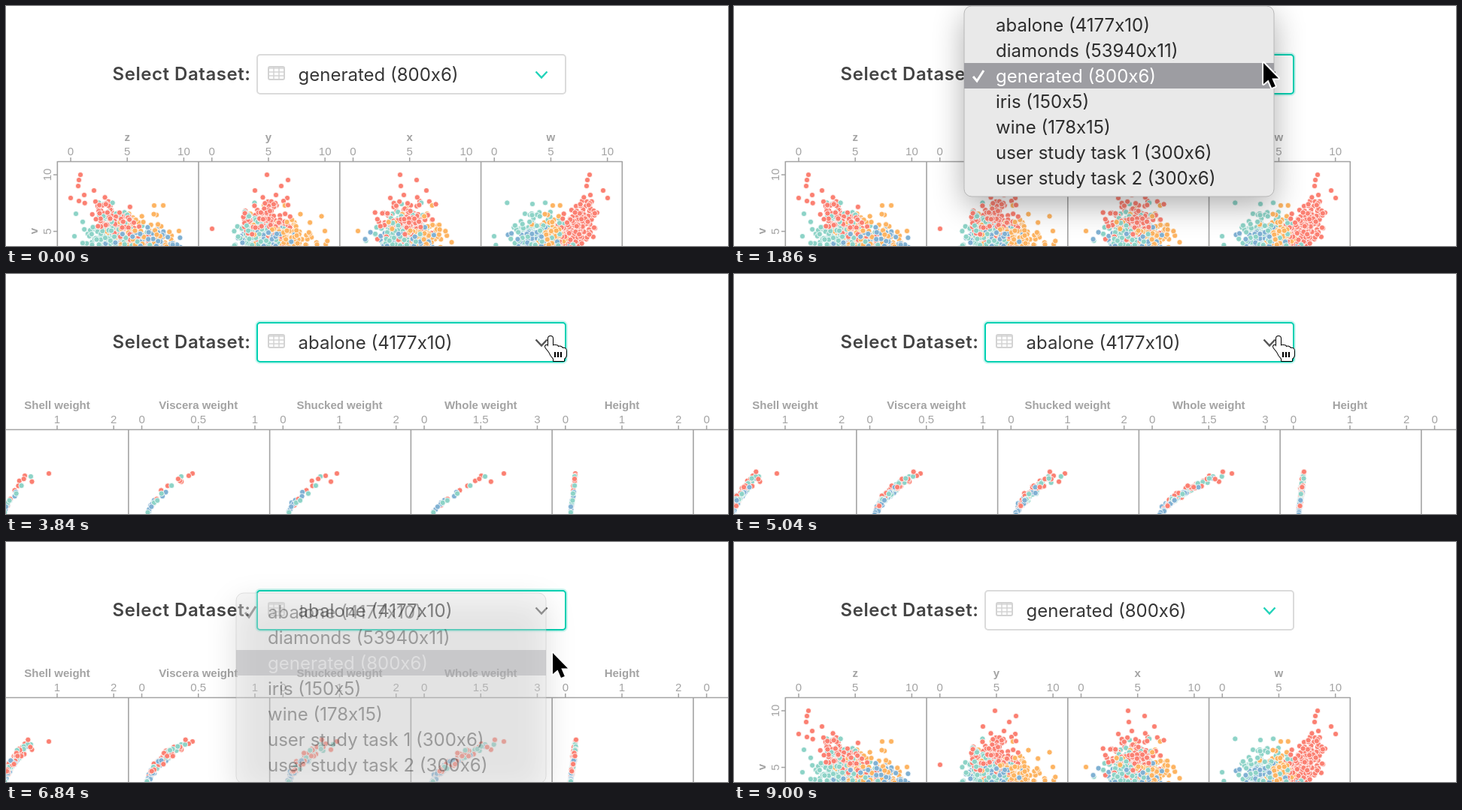
Animation, 960 px wide and 320 px high, one loop 9.06 s. Source, as an HTML page with a canvas:

```html
<!DOCTYPE html>
<html lang="en">
<head>
<meta charset="utf-8">
<title>Dataset picker</title>
<style>
html, body { margin: 0; width: 100%; height: 100%; overflow: hidden; background: #fff; }
canvas { display: block; }
</style>
</head>
<body>
<canvas id="stage" width="960" height="320"></canvas>
<script>
const ctx = document.getElementById('stage').getContext('2d');
const LOOP = 9060, STEP = 60;
const RED = '#fb8072', TEAL = '#8dd3c7', ORANGE = '#fdb462', BLUE = '#80b1d3';
const ACCENT = '#00d1b2', INK = '#363636', AXIS = '#a3a3a3';
const UI = 'Inter, sans-serif', PLOT = '"Liberation Sans", Arial, sans-serif';
const ITEMS = ['abalone (4177x10)', 'diamonds (53940x11)', 'generated (800x6)', 'iris (150x5)',
  'wine (178x15)', 'user study task 1 (300x6)', 'user study task 2 (300x6)'];
const PITCH = 187.75, TICK = 75.2;

// Cursor path: time, x, y of the tip
const PATH = [[60, 975, 335], [960, 722, 84], [1320, 722, 84], [1800, 704, 76], [2040, 704, 76],
  [2580, 672, 20], [2760, 672, 20], [2940, 672, 28], [3540, 722, 83], [5220, 722, 83],
  [5700, 717, 107], [5940, 717, 107], [6540, 727, 148], [LOOP, 727, 148]];
const MENUS = [{ open: 1320, close: 2750, top: 0, checked: 2 }, { open: 5100, close: 6750, top: 68, checked: 0 }];
const FADE = 150;

const clamp = v => Math.max(0, Math.min(1, v));
const ramp = (t, a, b) => clamp((t - a) / (b - a));

let seed = 20;
function random() {
  seed = (seed + 0x6d2b79f5) | 0;
  let n = Math.imul(seed ^ (seed >>> 15), seed | 1);
  n ^= n + Math.imul(n ^ (n >>> 7), n | 61);
  return ((n ^ (n >>> 14)) >>> 0) / 4294967296;
}
const gauss = (mean, sd) =>
  mean + sd * Math.sqrt(-2 * Math.log(1 - random())) * Math.cos(2 * Math.PI * random());

function generatedDots() {
  // Few distinct points in pixels: colour, y, then x in each panel
  const dots = [[RED, 225, 99, 347, 524, 776], [RED, 232, 97, 375, 546, 773], [RED, 240, 96, 366, 525, 772],
    [RED, 246, 117, 331, 559, 794], [RED, 252, 104, 359, 529, 777], [RED, 256, 86, 374, 511, 800],
    [RED, 260, 97, 369, 550, 766], [RED, 297, 134, 274, 520, 757], [ORANGE, 266, 197, 343, 534, 727],
    [ORANGE, 300, 230, 424, 468, 716], [TEAL, 264, 130, 345, 526, 700], [TEAL, 277, 93, 322, 514, 690],
    [TEAL, 307, 91, 318, 497, 649]].map(([color, y, ...xs]) => ({ color, y, xs }));
  const clusters = [
    [RED, 5.35, 1.05, v => [gauss(9.2 - v * .87, .9), gauss(4.9, .95), gauss(4.7, 1.05), gauss(5.1 + v * .4, .75)]],
    [TEAL, 4.2, 1.15, () => [gauss(3.9, 1.3), gauss(4.2, 1), gauss(4.1, 1.25), gauss(3.7, 1.15)]],
    [ORANGE, 4.2, 1, () => [gauss(6, 1.3), gauss(6.3, 1.4), gauss(5.3, 1.3), gauss(5.1, .6)]],
    [BLUE, 3.6, .8, () => [gauss(6.5, 1.4), gauss(4.6, 1), gauss(4.7, 1.1), gauss(4, 1.1)]]
  ];
  while (dots.length < 800) {
    const [color, mean, sd, place] = clusters[dots.length % 4];
    const v = Math.min(8, gauss(mean, sd));
    dots.push({ color, y: 375.5 - 15.04 * v, xs: place(v).map((x, i) => 86 + i * PITCH + 15.04 * x) });
  }
  return dots;
}

function abaloneDots() {
  const dots = [{ color: RED, y: 266, xs: [57, 248, 440, 662, 757] },
    { color: RED, y: 269, xs: [25, 243, 425, 632, 757] }, { color: TEAL, y: 270, xs: [33, 233, 418, 637, 756] }];
  while (dots.length < 150) {
    const size = Math.min(.76, gauss(.55, .105));
    const whole = 4.7 * size ** 3 * gauss(1, .1);
    const young = size < .47 ? .75 : size < .57 ? .3 : .04;
    const color = random() < young ? BLUE : random() < .5 ? RED : TEAL;
    const units = [.29 * whole / 2, .215 * whole, .43 * whole / 2, whole / 3, gauss(.245, .015) * size / 2];
    dots.push({ color, y: 266 + (.74 - size) * 142,
      xs: units.map((u, i) => -7 + i * PITCH + 2 * TICK * u * (i < 3 ? gauss(1, .09) : 1)) });
  }
  return dots;
}

const CHARTS = {
  generated: { start: 161.2, dots: generatedDots(),
    columns: ['z', 'y', 'x', 'w'].map(name => [name, '0', '5', '10']) },
  abalone: { start: 68, dots: abaloneDots(),
    columns: [['Shell weight', '0', '1', '2'], ['Viscera weight', '0', '0.5', '1'],
      ['Shucked weight', '0', '1', '2'], ['Whole weight', '0', '1.5', '3'],
      ['Height', '0', '1', '2'], ['Diameter', '0', '0.5', '1']] }
};

function text(str, x, y, font, color, align = 'left') {
  ctx.font = font;
  ctx.fillStyle = color;
  ctx.textAlign = align;
  ctx.fillText(str, x, y);
}

function line(points, color, width) {
  ctx.beginPath();
  points.forEach(([x, y]) => ctx.lineTo(x, y));
  ctx.strokeStyle = color;
  ctx.lineWidth = width;
  ctx.stroke();
}

function box(x, y, w, h, r) {
  ctx.beginPath();
  ctx.roundRect(x, y, w, h, r);
}

function sideways(str, x, y, font) {
  ctx.save();
  ctx.translate(x, y);
  ctx.rotate(-Math.PI / 2);
  text(str, 0, 0, font, AXIS, 'center');
  ctx.restore();
}

function drawChart(name, share) {
  const { start, columns, dots } = CHARTS[name];
  const left = start - PITCH / 2 + 1, right = left + columns.length * PITCH;
  const plain = '15px ' + PLOT, bold = 'bold 15px ' + PLOT;
  line([[left, 207.5], [right, 207.5]], AXIS, 1.6);
  line([[right, 207], [right, 320]], AXIS, 1.6);
  columns.forEach(([title, ...ticks], i) => {
    const mid = start + i * PITCH, edge = left + i * PITCH;
    line([[edge, 207], [edge, 320]], AXIS, 1.6);
    text(title, mid, 180, bold, AXIS, 'center');
    ticks.forEach((label, k) => {
      const x = mid + (k - 1) * TICK;
      text(label, x, 199, plain, AXIS, 'center');
      line([[x, 202], [x, 207]], AXIS, 1.5);
    });
  });
  if (name === 'generated') {
    sideways('v', 42, 300, bold);
    [['10', 225], ['5', 300.5]].forEach(([label, y]) => {
      sideways(label, 60, y, plain);
      line([[63, y], [68, y]], AXIS, 1.5);
    });
  }
  ctx.strokeStyle = '#fff';
  ctx.lineWidth = .8;
  dots.slice(0, Math.round(share * dots.length)).forEach(({ color, y, xs }) => {
    if (y > 325) return;
    ctx.fillStyle = color;
    xs.forEach(x => {
      ctx.beginPath();
      ctx.arc(x, y, 3.6, 0, 7);
      ctx.fill();
      ctx.stroke();
    });
  });
}

function drawSelectFrame(border, chevron, glow) {
  box(334, 65, 410, 52, 4);
  if (glow) {
    ctx.strokeStyle = 'rgba(0,209,178,.2)';
    ctx.lineWidth = 6;
    ctx.stroke();
  }
  ctx.strokeStyle = border;
  ctx.lineWidth = 2;
  ctx.fillStyle = '#fff';
  ctx.fill();
  ctx.stroke();
  line([[704.5, 87.5], [712, 95.5], [719.5, 87.5]], chevron, 2.5);
}

function drawSelect(value, focus, hover) {
  ctx.letterSpacing = '.55px';
  text('Select Dataset:', 141.5, 99, '600 24px ' + UI, '#444');
  ctx.letterSpacing = '0px';
  drawSelectFrame('#dbdbdb', hover ? '#555' : '#22d3b9', false);
  if (focus) {
    ctx.globalAlpha = focus;
    drawSelectFrame(ACCENT, '#555', true);
    ctx.globalAlpha = 1;
  }
  box(349, 81, 21, 17, 2);
  ctx.strokeStyle = '#d3d3d3';
  ctx.lineWidth = 2;
  ctx.stroke();
  [83, 88, 93].forEach(y => line([[349, y], [370, y]], '#d3d3d3', 1.5));
  [356, 363].forEach(x => line([[x, 82], [x, 98]], '#d3d3d3', 1.5));
  text(value, 388.5, 100, '24px ' + UI, INK);
}

function drawMenu({ top, checked }, alpha, pointerY) {
  const hovered = Math.floor((pointerY - 3 - top) / 34);
  ctx.save();
  ctx.globalAlpha = alpha;
  ctx.shadowColor = 'rgba(0,0,0,.32)';
  ctx.shadowBlur = 42;
  ctx.shadowOffsetY = 12;
  box(306, top, 412, 254, 10);
  ctx.fillStyle = '#e9e9e9';
  ctx.fill();
  ctx.shadowColor = 'transparent';
  ctx.strokeStyle = '#b8b8b8';
  ctx.lineWidth = 1;
  ctx.stroke();
  ITEMS.forEach((item, i) => {
    const y = top + 25 + i * 34, color = i === hovered ? '#fff' : '#2c2c2c';
    if (i === hovered) {
      ctx.fillStyle = '#9d9da2';
      ctx.fillRect(306, y - 17, 412, 34);
    }
    text(item, 348, y + 9, '24px ' + UI, color);
    if (i === checked) line([[318, y + 1], [323, y + 7], [332, y - 7]], color, 3);
  });
  ctx.restore();
}

const ARROW = new Path2D('M0 0V28L6.5 22.5 11 33 15.8 31 11.3 20.5H20Z');
const HAND = new Path2D('M-1 3q0-3 3-3t3 3v10q1-2 4-1 3 0 3 2 3-1 4 0 2 1 2 2 5-1 5 4v5q0 3-3 5v3h-14v-3q-4-4-6-9l-4-5q-2-3 0-4 2-1 3 2z');
const KNUCKLES = new Path2D('M8 21v7M12 21v7M16 21v7');

function drawCursor(x, y, hand, alpha) {
  ctx.save();
  ctx.globalAlpha = alpha;
  ctx.translate(x, y);
  ctx.lineJoin = 'round';
  ctx.strokeStyle = hand ? '#000' : '#fff';
  ctx.fillStyle = hand ? '#fff' : '#000';
  ctx.lineWidth = hand ? 2 : 4;
  ctx.stroke(hand ? HAND : ARROW);
  ctx.fill(hand ? HAND : ARROW);
  if (hand) ctx.stroke(KNUCKLES);
  ctx.restore();
}

function cursorAt(t) {
  const k = Math.max(1, PATH.findIndex(([time]) => time > t));
  const [t0, x0, y0] = PATH[k - 1], [t1, x1, y1] = PATH[k];
  const p = ramp(t, t0, t1), e = p * p * (3 - 2 * p);
  return [x0 + (x1 - x0) * e, y0 + (y1 - y0) * e];
}

function draw(t) {
  const [x, y] = cursorAt(t);
  const menu = MENUS.find(m => t >= m.open && t < m.close + FADE);
  const inside = x > 334 && x < 744 && y > 64 && y < 118;
  const ending = 1 - ramp(t, 8100, 8940);
  ctx.fillStyle = '#fff';
  ctx.fillRect(0, 0, 960, 320);
  if (t >= 3300 && t < 7140) drawChart('abalone', .16 + .84 * ramp(t, 3900, 5400));
  else drawChart('generated', t < 7140 ? 1 : .25 + .75 * ramp(t, 7140, 7560));
  drawSelect(ITEMS[t >= 2880 && t < 6930 ? 0 : 2], t < 1260 ? 0 : ending, inside);
  if (menu) drawMenu(menu, 1 - ramp(t, menu.close, menu.close + FADE), y);
  if (t >= 60) drawCursor(x, y, inside && !menu, ending);
}

function tick(now) {
  draw(Math.floor((now % LOOP) / STEP) * STEP);
  requestAnimationFrame(tick);
}
requestAnimationFrame(tick);
</script>
</body>
</html>
```
